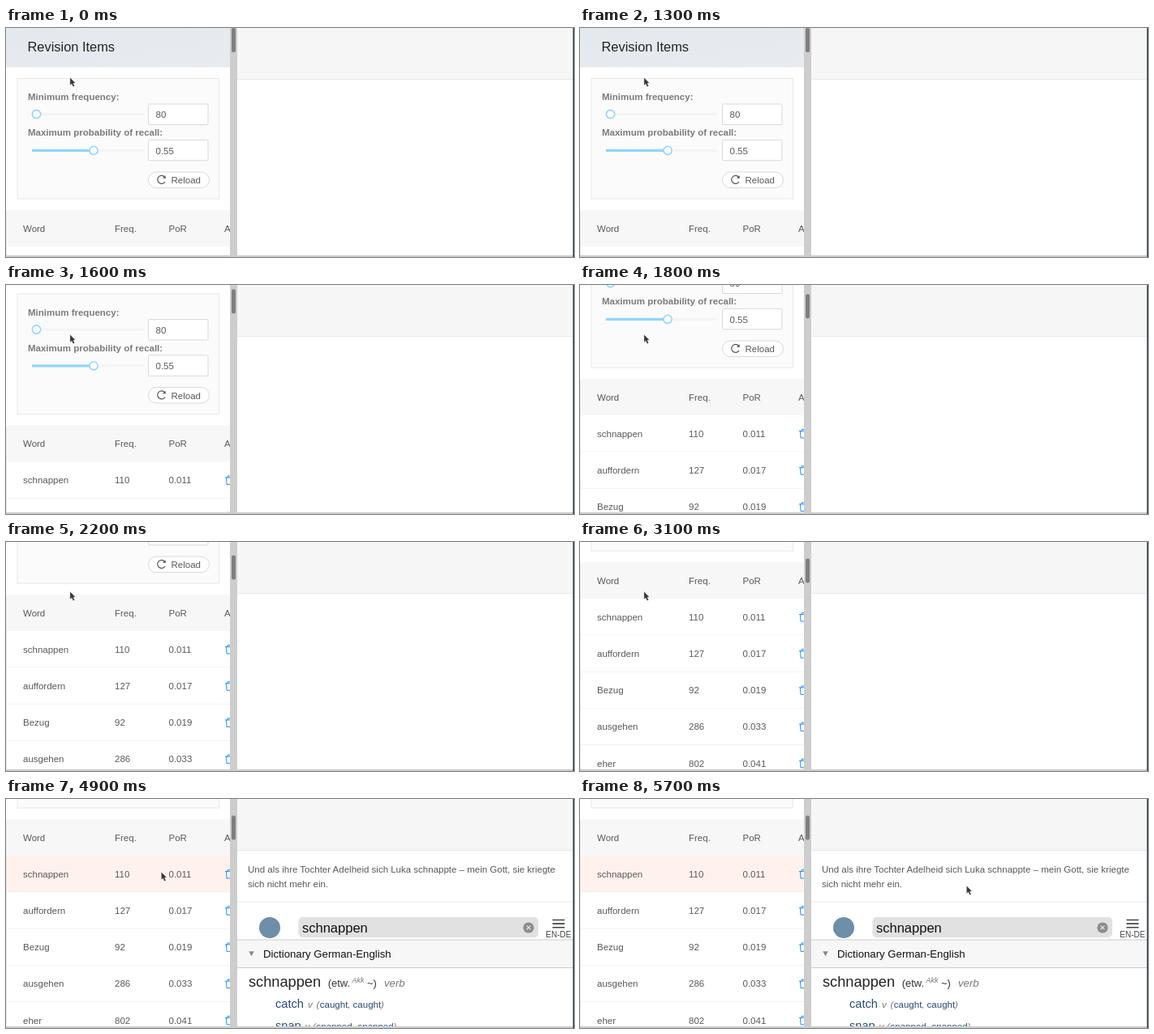
Write an HTML page that moves like this. It is 700 px wide and 283 px high and loops after 5.9 s.

```html
<!DOCTYPE html>
<html lang="en">
<head>
<meta charset="utf-8">
<title>Revision items</title>
<style>
  html, body { margin: 0; width: 100%; height: 100%; overflow: hidden; background: #fff; }
  svg { display: block; width: 700px; height: 283px; }
  text { font: 11.5px "Liberation Sans", Arial, sans-serif; fill: #595959; white-space: pre; }
  .label { font-weight: bold; fill: #7b7b7b; }
  .field { fill: #fff; stroke: #d9d9d9; }
  .rail { stroke: #f5f5f5; stroke-width: 3.3; stroke-linecap: round; }
  .track { stroke: #91d5ff; stroke-width: 3.3; }
  .knob { fill: #fff; stroke: #91d5ff; stroke-width: 1.6; }
  .rule { stroke: #e8e8e8; }
  .icon { fill: none; stroke: #1890ff; stroke-width: 1; }
  .it { font-style: italic; fill: #777; }
  .link { fill: #264a73; }
</style>
</head>
<body>
<svg viewBox="0 0 700 283" width="700" height="283">
  <defs>
    <clipPath id="leftClip"><rect width="276" height="281"/></clipPath>
    <clipPath id="rightClip"><rect x="285" width="414" height="281"/></clipPath>
    <linearGradient id="headFill" x2="1" y2="1">
      <stop offset="0" stop-color="#e4e9ed"/><stop offset="1" stop-color="#e8ebef"/>
    </linearGradient>
  </defs>
  <rect width="700" height="283" fill="#fff"/>

  <g clip-path="url(#leftClip)">
    <g id="panel">
      <rect width="276" height="48" fill="url(#headFill)"/>
      <path class="rule" d="M0 48H276"/>
      <text x="26.5" y="29" style="font-size:16.4px;fill:#222">Revision Items</text>

      <rect x="14" y="62.5" width="248.5" height="148.5" fill="#fbfbfb" stroke="#e8e8e8"/>
      <text class="label" x="27" y="89">Minimum frequency:</text>
      <text class="label" x="27" y="133">Maximum probability of recall:</text>
      <path class="rail" d="M33 106.5H168M33 151.3H168"/>
      <path class="track" d="M32 106.5H37M32 151.3H108"/>
      <circle class="knob" cx="37.5" cy="106.5" r="5.1"/>
      <circle class="knob" cx="108" cy="151.3" r="5.1"/>
      <rect class="field" x="175.5" y="94" width="73.5" height="25.5" rx="1.5"/>
      <rect class="field" x="175.5" y="138.3" width="73.5" height="25.5" rx="1.5"/>
      <text x="184.5" y="111">80</text>
      <text x="184.5" y="155.5">0.55</text>
      <rect class="field" x="175.5" y="178" width="75" height="19.5" rx="9.7"/>
      <path d="M195.6 184.2A5 5 0 1 0 196 190" fill="none" stroke="#555" stroke-width="1.2"/>
      <path d="M196.7 182.2V186L193 185.5Z" fill="#555"/>
      <text x="203.5" y="192">Reload</text>

      <rect y="225" width="290" height="45" rx="3" fill="#f7f7f7"/>
      <g id="rows"></g>
      <path class="rule" d="M.5 227V520"/>
    </g>
  </g>

  <rect x="276" width="9" height="283" fill="#cdcdcd"/>
  <rect id="thumb" x="278" width="5" height="30" rx="2" fill="#7f7f7f"/>

  <rect x="285" width="414" height="63.5" fill="#f6f6f6"/>
  <path class="rule" d="M285 63.5H699"/>
  <g id="sentence">
    <text x="298" y="91">Und als ihre Tochter Adelheid sich Luka schnappte – mein Gott, sie kriegte</text>
    <text x="298" y="109">sich nicht mehr ein.</text>
    <path class="rule" d="M285 127H699"/>
  </g>

  <g id="dictionary" clip-path="url(#rightClip)">
    <circle cx="325" cy="159" r="13" fill="#6f8ea8"/>
    <rect x="360.5" y="146" width="295.5" height="25.3" rx="5" fill="#e1e1e1"/>
    <text x="365" y="164.5" style="font-size:16.5px;fill:#111">schnappen</text>
    <circle cx="644" cy="159" r="6.6" fill="#8b8b8b"/>
    <path d="M641.6 156.6l4.8 4.8m0-4.8l-4.8 4.8" stroke="#e8e8e8" stroke-width="1.3"/>
    <path d="M673.5 149.5h15m-15 4.6h15m-15 4.6h15" stroke="#444" stroke-width="1.6"/>
    <text x="665.3" y="171" style="font-size:10px;fill:#444">EN-DE</text>
    <rect x="285" y="174" width="414" height="34.5" fill="#f7f7f7"/>
    <path d="M285 174H699M285 208.5H699" stroke="#ccc"/>
    <path d="M299.3 188.3h6.4l-3.2 6z" fill="#888"/>
    <text x="317" y="196" style="font-size:13.2px;fill:#111">Dictionary German-English</text>
    <text x="299" y="232" style="font-size:18.2px;fill:#222">schnappen</text>
    <text x="396.7" y="231.5" style="font-size:13px;fill:#333">(etw.</text>
    <text class="it" x="426.5" y="227" style="font-size:9px">Akk</text>
    <text x="445" y="231.5" style="font-size:13px;fill:#333">~)</text>
    <text class="it" x="466" y="231.5" style="font-size:13.2px">verb</text>
    <g id="meanings"></g>
  </g>

  <rect y="280.8" width="699" height="2.2" fill="#cdcdcd"/>
  <rect x="698.7" width="1.3" height="283" fill="#263842"/>

  <g id="status">
    <path d="M0 272.7H214.5a3 3 0 0 1 3 3V283H0Z" fill="#26282b"/>
    <text id="statusText" x="3" y="284" style="font:9.87px 'Noto Sans',sans-serif;fill:#f2f2f2"></text>
  </g>

  <path id="cursor" d="M.4 .3V9.7L2.5 7.9 4.2 11.6 6 10.8 4.4 7.2 7 6.9Z"
        fill="#383838" stroke="#fff" stroke-opacity=".5" stroke-width=".5"/>
</svg>

<script>
const LOOP = 5900, STEP = 100, ROW = 45.2;
const $ = id => document.getElementById(id);
const text = (x, y, s, attrs = "") => `<text x="${x}" y="${y}" ${attrs}>${s}</text>`;

const words = [
  ["schnappen", "110", "0.011"],
  ["auffordern", "127", "0.017"],
  ["Bezug", "92", "0.019"],
  ["ausgehen", "286", "0.033"],
  ["eher", "802", "0.041"]
];
const columns = [21, 134, 200.5, 269];
const cells = (values, y) => values.map((v, i) => text(columns[i], y, v)).join("");

function trash(y) {
  return `<path class="icon" transform="translate(270 ${y})"
    d="M0 -3.3H11M1.5 -3.3L2 5.2H9L9.5 -3.3M3.2 -3.3V-5.3H7.8V-3.3"/>`;
}

$("rows").innerHTML = cells(["Word", "Freq.", "PoR", "Action"], 251.5) +
  words.map((word, i) => {
    const top = 270 + i * ROW, end = top + ROW;
    return `<rect ${i ? "" : 'id="hover"'} y="${top}" width="276" height="${ROW}" fill="${i ? "#fff" : "#fff2ed"}"/>` +
      `<path class="rule" d="M0 ${end}H276"/>` +
      cells(word, top + 26.8) + trash(top + 22.8);
  }).join("");

// Translation line: verb, "v" mark and its two past forms.
function meaning(y, verb, form, x) {
  const [mark, open, first, comma, second, close] = x;
  const size = px => `style="font-size:${px}px"`;
  return text(332, y, verb, 'class="link" ' + size(14.6)) +
    text(mark, y, "v", 'class="it" ' + size(11.5)) +
    text(open, y, "(", 'class="it"') + text(first, y, form, 'class="link"') +
    text(comma, y, ",", 'class="it"') + text(second, y, form, 'class="link"') +
    text(close, y, ")", 'class="it"');
}
$("meanings").innerHTML =
  meaning(258, "catch", "caught", [372, 382.5, 386.8, 421.3, 427.6, 462]) +
  meaning(285, "snap", "snapped", [368.5, 378, 382.5, 427, 433.5, 477.5]);

const wheel = [0, 14, 32, 51.5, 80, 109, 123, 138, 151, 160];
function scrollAt(t) {
  if (t >= 3100) return 200;
  const i = Math.floor((t - 1300) / STEP);
  return wheel[Math.max(0, Math.min(i, wheel.length - 1))];
}

const pointer = [
  [0, 78.5, 61], [3300, 81, 83], [3400, 85, 107], [4900, 191, 90],
  [5100, 296, 109], [5500, 438, 97], [5700, 476, 107]
];
const pointerAt = t => pointer.filter(p => p[0] <= t).pop();

const show = (id, on) => $(id).setAttribute("visibility", on ? "visible" : "hidden");
const move = (id, x, y) => $(id).setAttribute("transform", `translate(${x} ${y})`);

function draw(t) {
  const scroll = scrollAt(t), [, x, y] = pointerAt(t);
  move("panel", 0, -scroll);
  move("thumb", 0, scroll * 0.103);
  move("cursor", x, y);
  show("hover", t >= 3300);
  show("sentence", t >= 4100);
  show("status", t >= 4100 && t < 4900);
  show("dictionary", t >= 4900);
  $("statusText").textContent = (t >= 4700 ? "Waiting for " : "") + "android.talbone.com" + (t >= 4700 ? "…" : "");
}

const start = performance.now();
function tick() {
  draw((performance.now() - start) % LOOP);
  requestAnimationFrame(tick);
}
tick();
</script>
</body>
</html>
```
